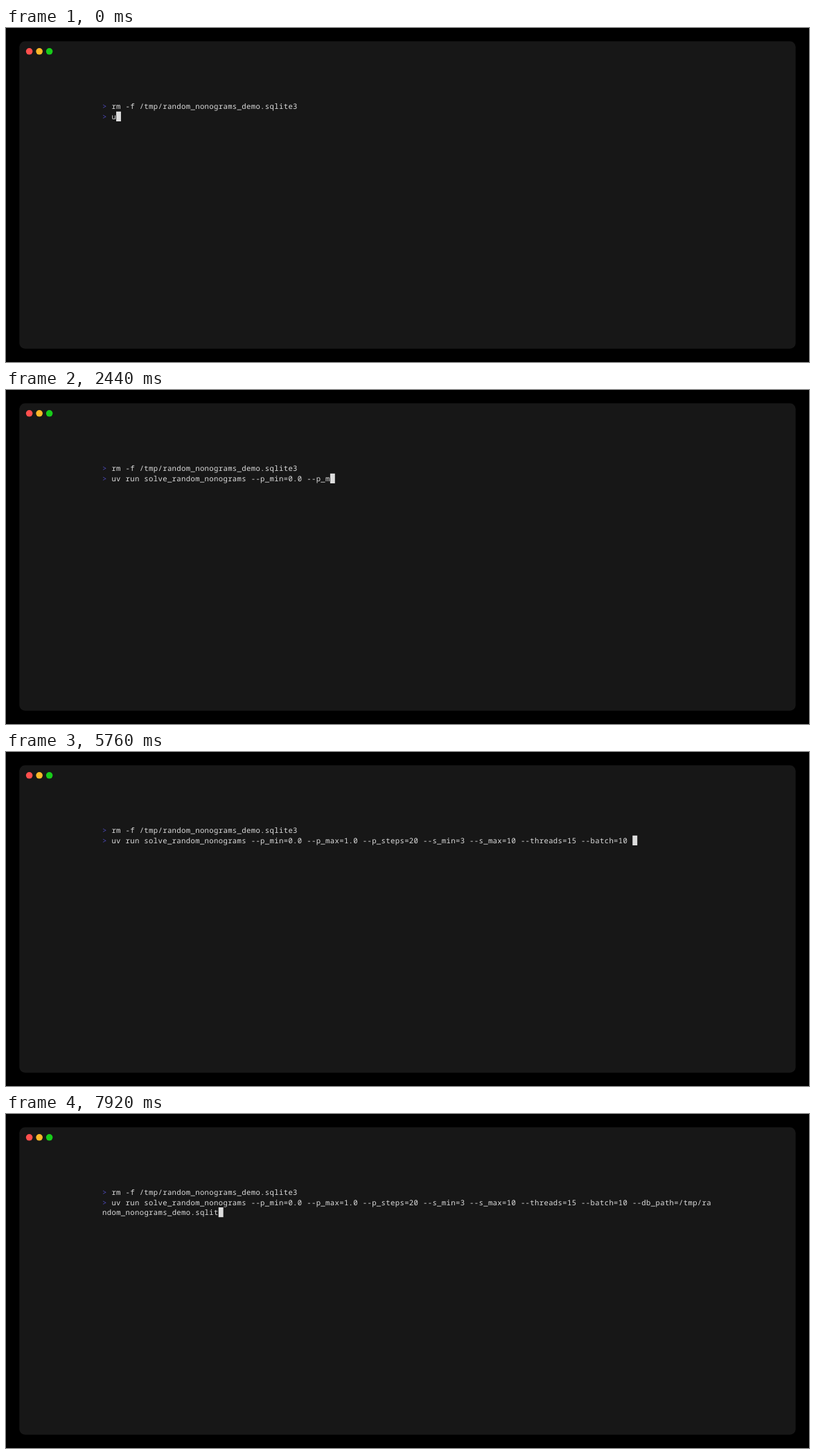
An HTML page for the animation above (8000 ms loop, 1159 px wide and 483 px high).

```html
<!DOCTYPE html>
<html lang="en">
<head>
<meta charset="utf-8">
<title>Terminal typing</title>
<style>
  html, body { margin: 0; width: 100%; height: 100%; overflow: hidden; background: #000; }
  svg { display: block; width: 1159px; height: 483px; }
  text {
    font-family: "Noto Sans Mono", "DejaVu Sans Mono", monospace;
    font-size: 10.6px;
    letter-spacing: calc(6.714px - 0.6em);
    font-variant-ligatures: none;
    text-rendering: geometricPrecision;
    white-space: pre;
    fill: #ddd;
  }
  .prompt { fill: #5a56e0; opacity: 0.8; }
</style>
</head>
<body>
<svg viewBox="0 0 1159 483">
  <rect x="19.3" y="19.3" width="1120.4" height="444.4" rx="8" fill="#171717"/>
  <circle cx="33.6" cy="33.8" r="4.8" fill="#ff4f4d"/>
  <circle cx="48.1" cy="33.8" r="4.8" fill="#fbb828"/>
  <circle cx="62.6" cy="33.8" r="4.8" fill="#17cc1a"/>
  <text class="prompt" x="139" y="117.3">&gt;</text>
  <text x="152.4" y="117.3">rm -f /tmp/random_nonograms_demo.sqlite3</text>
  <text class="prompt" x="139" y="131.5">&gt;</text>
  <text id="first" x="152.4" y="131.5"></text>
  <text id="second" x="139" y="145.7"></text>
  <rect id="cursor" width="6.9" height="14.2" fill="#ddd"/>
</svg>
<script>
const LOOP = 8000, TICK = 40;
const PACE = 51.4, LEAD = 13.5; // ms per key, head start of the first key
const CELL = 6.714, ROW = 14.2, LEFT = 138.9, TOP = 120.8;
const COLS = 131, PROMPT = 2, SPLIT = COLS - PROMPT;
const command = 'uv run solve_random_nonograms --p_min=0.0 --p_max=1.0 --p_steps=20' +
  ' --s_min=3 --s_max=10 --threads=15 --batch=10' +
  ' --db_path=/tmp/random_nonograms_demo.sqlit';

const [first, second, cursor] = ['first', 'second', 'cursor']
  .map(id => document.getElementById(id));
const start = performance.now();
let shown = 0;

// Keys arrive at a steady pace; the screen refreshes once per tick.
function typedAt(time) {
  const t = Math.floor(time / TICK) * TICK;
  return Math.max(1, Math.min(command.length, Math.floor((t + LEAD) / PACE)));
}

function show(n) {
  const cell = n + PROMPT;
  first.textContent = command.slice(0, Math.min(n, SPLIT));
  second.textContent = command.slice(SPLIT, Math.max(n, SPLIT));
  cursor.setAttribute('x', LEFT + cell % COLS * CELL);
  cursor.setAttribute('y', TOP + Math.floor(cell / COLS) * ROW);
}

function draw() {
  const n = typedAt((performance.now() - start) % LOOP);
  if (n !== shown) show(shown = n);
  requestAnimationFrame(draw);
}
draw();
</script>
</body>
</html>
```
